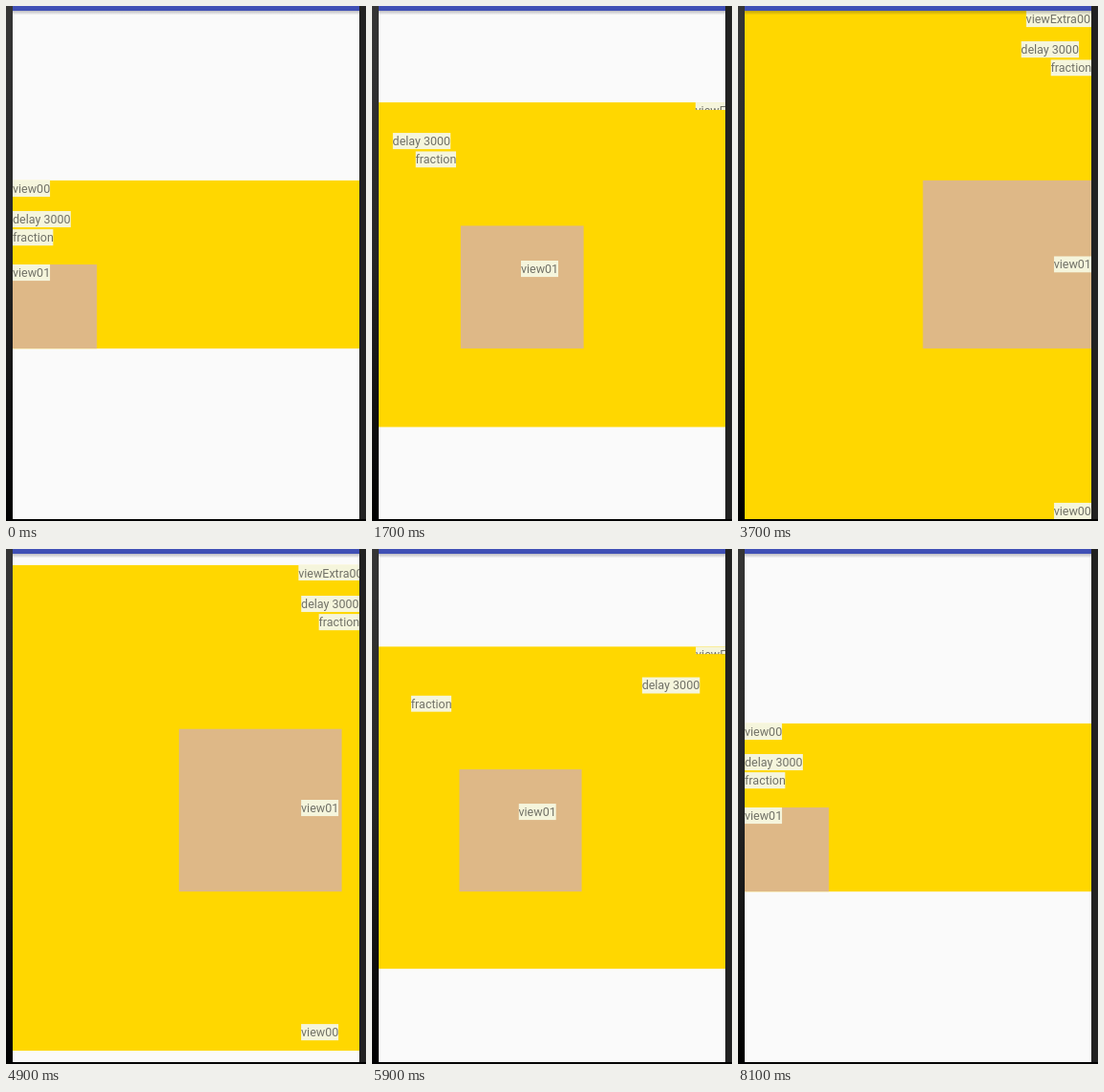
These frames come from a looping animation (377x540 px, 9.2 s). An HTML page:

```html
<!DOCTYPE html>
<html lang="en">
<head>
<meta charset="utf-8">
<title>Expanding view</title>
<style>
  html, body { margin: 0; width: 100%; height: 100%; overflow: hidden; background: #fafafa; }
  svg { display: block; width: 100vw; height: 100vh; }
  text { font: 12.5px Roboto, Arial, sans-serif; fill: #717167; }
</style>
</head>
<body>
<svg id="stage" viewBox="0 0 377 540">
  <defs>
    <linearGradient id="edge" x1="0" y1="0" x2="0" y2="1">
      <stop offset="0" stop-color="#353535"/>
      <stop offset=".5" stop-color="#242424"/>
      <stop offset=".93" stop-color="#060606"/>
      <stop offset="1" stop-color="#000"/>
    </linearGradient>
    <linearGradient id="shade" x1="0" y1="0" x2="0" y2="1">
      <stop offset="0" stop-color="#223" stop-opacity=".28"/>
      <stop offset="1" stop-color="#223" stop-opacity="0"/>
    </linearGradient>
  </defs>
  <rect width="377" height="540" fill="#fafafa"/>
  <rect id="panel" x="7" width="363" fill="#ffd700"/>
  <g id="back"></g>
  <rect id="box" fill="#deb887"/>
  <g id="front"></g>
  <rect x="7" y="5" width="363" height="4.5" fill="url(#shade)"/>
  <rect x="7" width="363" height="5" fill="#3f4fb5"/>
  <rect width="7" height="540" fill="url(#edge)"/>
  <rect x="370" width="7" height="540" fill="#212121"/>
  <rect y="538" width="377" height="2" fill="#000"/>
</svg>
<script>
const NS = 'http://www.w3.org/2000/svg';
const LOOP = 9200, STEP = 100, DURATION = 2750;
const LEFT = 7, RIGHT = 370, LABEL_H = 17.3;
const $ = id => document.getElementById(id);

function make(tag, attrs, parent) {
  const el = document.createElementNS(NS, tag);
  set(el, attrs);
  return parent.appendChild(el);
}

function set(el, attrs) {
  for (const key in attrs) el.setAttribute(key, attrs[key]);
}

// A nested svg clips its text to the label's own bounds.
function label(str, width, parent) {
  const el = make('svg', { width, height: LABEL_H, overflow: 'hidden' }, parent);
  make('rect', { width: '100%', height: '100%', fill: '#f5f5dc' }, el);
  make('text', { x: 0, y: 13.1 }, el).textContent = str;
  return { el, width };
}

const view00 = label('view00', 39.3, $('back'));
const view01 = label('view01', 39.3, $('front'));
const delayed = label('delay 3000', 60.9, $('front'));
const partial = label('fraction', 42.6, $('front'));
const extra = label('viewExtra00', 68.4, $('front'));

const clamp = v => Math.min(1, Math.max(0, v));
const lerp = (a, b, p) => a + (b - a) * p;
const ease = u => (1 - Math.cos(Math.PI * u)) / 2;
const run = (t, start) => clamp((t - start) / DURATION);
const thereAndBack = (t, open, close) => ease(run(t, open) - run(t, close));

// Moves a label from the left edge to the right edge.
function slide(item, p, y) {
  set(item.el, { x: lerp(LEFT, RIGHT - item.width, p), y });
}

function draw(time) {
  const t = Math.floor(time % LOOP / STEP) * STEP;
  const p = thereAndBack(t, 395, 4442);
  const late = thereAndBack(t, 1312, 5374);
  const top = lerp(182.9, 5, p), bottom = lerp(359.2, 538, p);
  const size = lerp(88.2, 176.4, p);

  set($('panel'), { y: top, height: bottom - top });
  set($('box'), { x: lerp(LEFT, RIGHT - 176.4, p), y: 359.2 - size, width: size, height: size });
  slide(view00, p, lerp(182.9, 538 - LABEL_H, p));
  slide(view01, p, lerp(271, 262.3, p));
  slide(delayed, late, top + 32);
  slide(partial, clamp((p - 0.4) / 0.5), top + 51.2);

  const w = extra.width * p;
  set(extra.el, { x: RIGHT - w, y: top, width: w, height: LABEL_H * p });
}

let begin;
function tick(now) {
  begin ??= now;
  draw(now - begin);
  requestAnimationFrame(tick);
}
draw(0);
requestAnimationFrame(tick);
</script>
</body>
</html>
```
